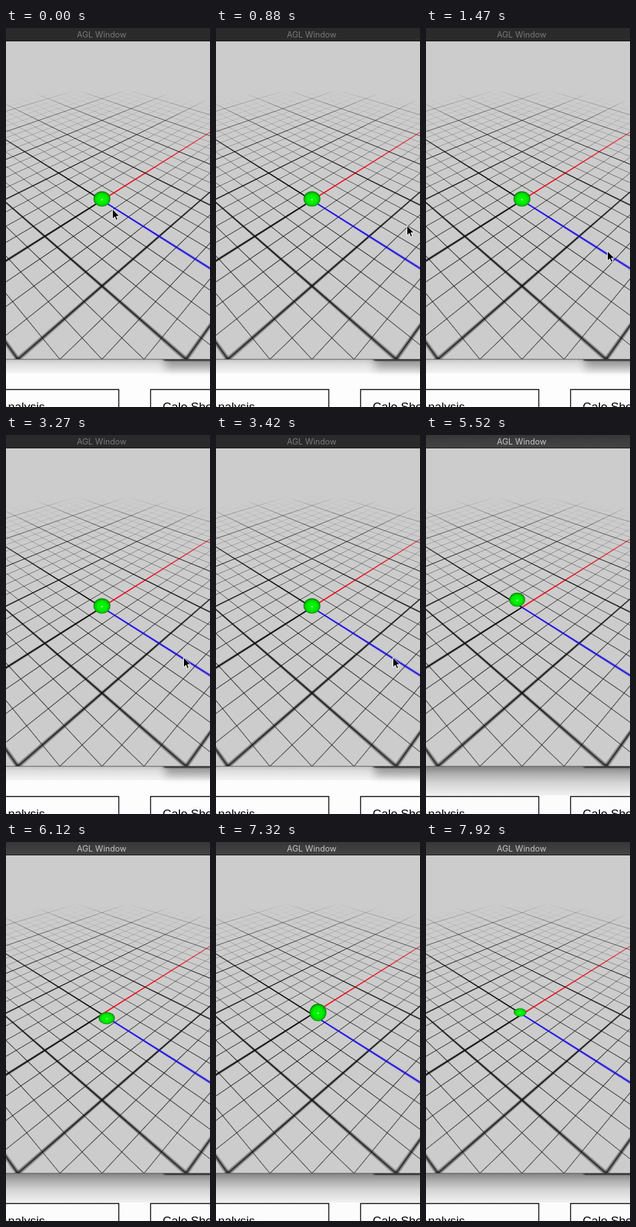
These frames come from a looping animation (321x596 px, 8000 ms). An HTML page with a canvas:

```html
<!DOCTYPE html>
<html>
<head>
<meta charset="utf-8">
<style>
  html, body { margin: 0; width: 321px; height: 596px; overflow: hidden; background: #fdfdfd; }
  canvas, svg { position: absolute; left: 0; top: 0; }
</style>
</head>
<body>
<svg width="321" height="596">
  <defs>
    <linearGradient id="softShadow" x2="0" y2="1">
      <stop offset="0" stop-color="#c6c6c6"/>
      <stop offset=".35" stop-color="#dfdfdf"/>
      <stop offset="1" stop-color="#f4f4f4"/>
    </linearGradient>
    <linearGradient id="deepShadow" x2="0" y2="1">
      <stop offset="0" stop-color="#828282"/>
      <stop offset=".25" stop-color="#adadad"/>
      <stop offset=".55" stop-color="#d2d2d2"/>
      <stop offset="1" stop-color="#f1f1f1"/>
    </linearGradient>
    <linearGradient id="activeBar" x2="0" y2="1">
      <stop offset="0" stop-color="#373738"/>
      <stop offset="1" stop-color="#444445"/>
    </linearGradient>
    <radialGradient id="green" cy=".52">
      <stop offset="0" stop-color="#00fa00"/>
      <stop offset=".55" stop-color="#00f000"/>
      <stop offset=".82" stop-color="#00cc00"/>
      <stop offset="1" stop-color="#007800"/>
    </radialGradient>
    <filter id="blur" x="-20%" y="-100%" width="140%" height="300%"><feGaussianBlur stdDeviation="1.2"/></filter>
    <filter id="wideBlur" x="-50%" y="-150%" width="200%" height="400%"><feGaussianBlur stdDeviation="7"/></filter>
    <clipPath id="below"><path d="M0 521H321V596H0Z"/></clipPath>
  </defs>
  <g clip-path="url(#below)">
    <g id="inactive">
      <path d="M0 521H321V543H0Z" fill="url(#softShadow)"/>
      <path d="M250 512H360V536H250Z" fill="#000" opacity=".28" filter="url(#wideBlur)"/>
    </g>
    <g id="active">
      <path d="M0 521H321V596H0Z" fill="#fcfcfc"/>
      <path d="M0 521H321V567H0Z" fill="url(#deepShadow)"/>
    </g>
    <path d="M246 515H340V523H252Q247 523 246 519Z" fill="#111" filter="url(#blur)"/>
  </g>
  <path d="M-5 568.5H177.500V600M227.500 600V568.500H330" fill="none" stroke="#000" stroke-width="1.4"/>
  <g font-family="Liberation Sans, sans-serif" font-size="19">
    <text x="-9.500" y="602">Analysis</text>
    <text x="246.500" y="602">Calo Shower</text>
  </g>
</svg>
<canvas id="grid" width="321" height="521"></canvas>
<svg width="321" height="596">
  <rect id="bar" width="321" height="20"/>
  <path d="M0 20.500H321" stroke="#111"/>
  <path d="M0 521H321" stroke="#555"/>
  <text id="title" x="150.500" y="15" text-anchor="middle" font-family="Inter, sans-serif" font-size="12.8">AGL Window</text>
  <g id="ball">
    <circle r="1" fill="url(#green)"/>
    <circle cy=".1" r=".09" fill="#d8ffd8"/>
  </g>
  <path id="cursor" d="M0 .7V16.200L3.600 12.900L6 18.300L8.500 17.200L6.200 12H11Z" fill="#000" stroke="#fff"/>
</svg>
<script>
const $ = id => document.getElementById(id);
const LOOP = 8000, ACTIVATE = 3720, HIDE_CURSOR = 4320;

// [time, tip x, tip y]
const cursorSteps = [
  [0, 167.5, 284], [290, 179.5, 316], [440, 197.5, 334], [580, 223.5, 334],
  [730, 277.5, 303], [880, 300.5, 310], [1030, 300.5, 325], [1180, 295.5, 341],
  [1320, 289.5, 348], [1470, 285.5, 350], [3270, 279.5, 349], [3420, 278.5, 349]
];
// [time, centre x, centre y, radius x, radius y]
const ballSteps = [
  [0, 151, 268.7, 13.3, 12], [5520, 143.5, 259, 12.5, 11], [6120, 158.5, 277, 12.7, 9.5],
  [6720, 142, 268, 11, 9], [7320, 160.5, 268, 13.2, 13.8], [7920, 148, 268, 10, 6.5]
];
const stepAt = (steps, t) => steps.filter(s => s[0] <= t).pop();

// Ground plane seen in perspective; one unit is the gap between heavy lines.
function drawGrid() {
  const CX = 151, HORIZON = -82, DEPTH = 353, SCALE = 77.5, TILT = .1382, REACH = 5;
  const DARK = [15, 15, 15], BLACK = [0, 0, 0], RED = [255, 0, 16], BLUE = [16, 0, 245];
  const ctx = $('grid').getContext('2d');
  const image = ctx.createImageData(321, 521);
  const cover = (dist, half, soft) => Math.min(1, 2 * half, Math.max(0, (half + soft - dist) / (2 * soft)));

  for (let y = 20; y < 521; y++) for (let x = 0; x < 321; x++) {
    const dx = x + .5 - CX, w = DEPTH / (y + .5 - HORIZON), zoom = 1 / w / w;
    const across = dx * w / SCALE, near = (1 - w) / TILT;
    const u = (across + near) / 2, v = (across - near) / 2;
    const gx = w / SCALE, gyA = -dx * w * w / (SCALE * DEPTH), gyN = w * w / (DEPTH * TILT);
    const fade = Math.max(0, 1 - (Math.hypot(u, v) / REACH) ** 1.3);
    const color = [204, 204, 204];
    const blend = (ink, alpha) => ink.forEach((c, n) => color[n] += (c - color[n]) * alpha);

    const families = [
      [u, Math.hypot(gx, gyA + gyN) / 2, v > 0 ? RED : BLACK],
      [v, Math.hypot(gx, gyA - gyN) / 2, u > 0 ? BLUE : BLACK]
    ];
    for (const [p, slope] of families) {
      const dist = Math.abs(p * 4 - Math.round(p * 4)) / 4 / slope;
      blend(DARK, fade * .95 * cover(dist, Math.min(.6, .4 * zoom), .5));
    }
    for (const [p, slope, ink] of families) {
      const line = Math.round(p), half = Math.max(line ? .55 : .85, .92 * zoom);
      blend(line ? DARK : ink, fade * cover(Math.abs(p - line) / slope, half, Math.max(.5, .7 * zoom)));
    }
    image.data.set([...color, 255], (y * 321 + x) * 4);
  }
  ctx.putImageData(image, 0, 0);
}

function frame(now) {
  const t = now % LOOP, active = t >= ACTIVATE;
  const [, cx, cy] = stepAt(cursorSteps, t);
  const [, bx, by, rx, ry] = stepAt(ballSteps, t);
  $('cursor').setAttribute('transform', `translate(${cx} ${cy})`);
  $('cursor').style.display = t < HIDE_CURSOR ? '' : 'none';
  $('ball').setAttribute('transform', `translate(${bx} ${by}) scale(${rx} ${ry})`);
  $('bar').setAttribute('fill', active ? 'url(#activeBar)' : '#2a2a2b');
  $('title').setAttribute('fill', active ? '#c8c8c8' : '#7a7a7a');
  $('active').style.display = active ? '' : 'none';
  $('inactive').style.display = active ? 'none' : '';
  requestAnimationFrame(frame);
}

drawGrid();
frame(performance.now());
</script>
</body>
</html>
```
